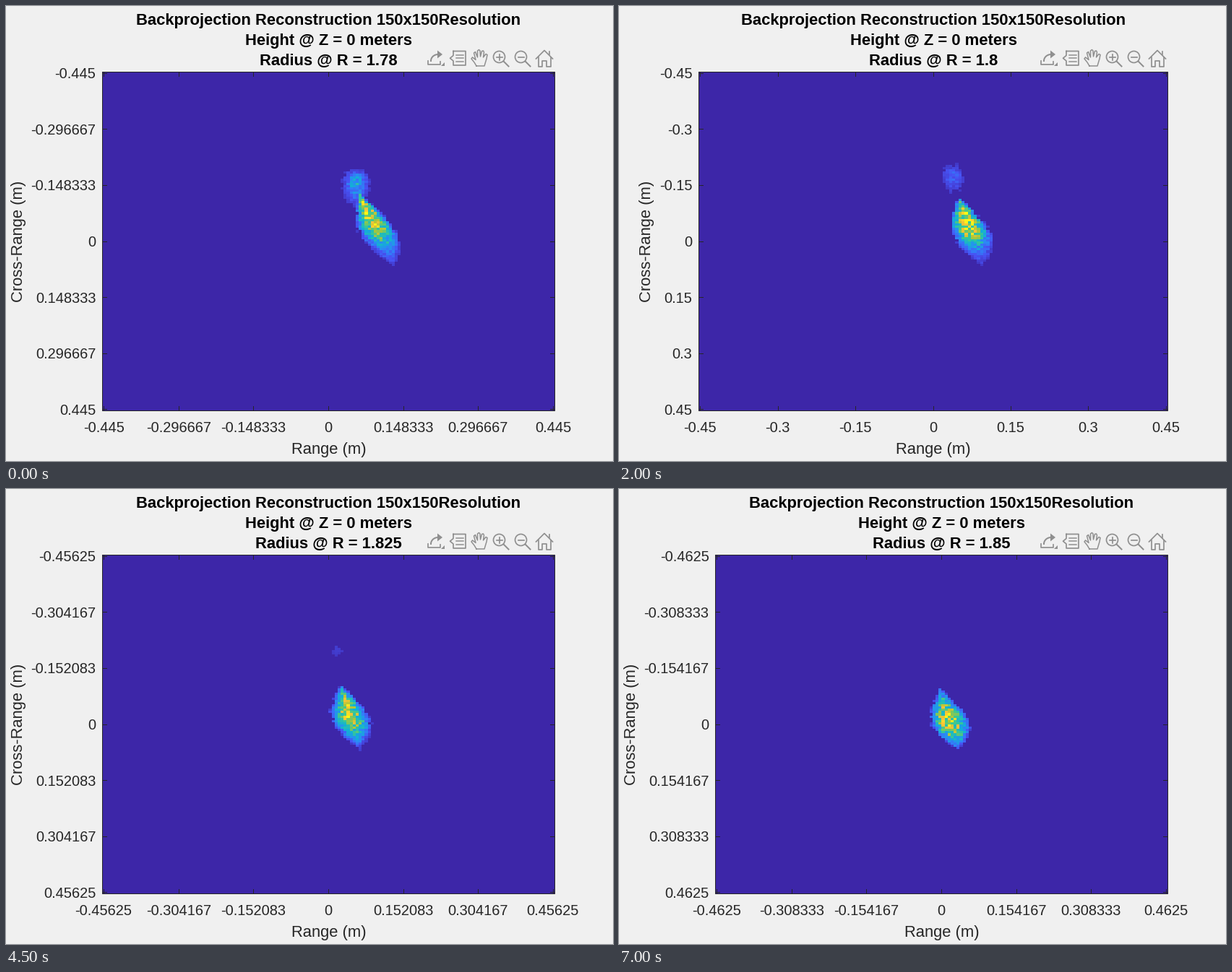
Write a matplotlib script that moves like this. It is 840 px wide and 630 px high and loops after 7.5 s.

```python
import numpy as np
import matplotlib.pyplot as plt
from matplotlib.animation import FuncAnimation
from matplotlib.collections import LineCollection
from matplotlib.colors import LinearSegmentedColormap
from matplotlib.patches import Circle, Polygon

W, H, DPI = 840, 630, 100
FRAMES, INTERVAL = 15, 500
TOP, BOTTOM, RIGHT = 91.5, 560.5, 759.5
CELLS = 150
INK, ICON = "#262626", "#8f8f8f"

plt.rcParams["font.family"] = "Liberation Sans"

parula = LinearSegmentedColormap.from_list("parula", [
    (0.2422, 0.1504, 0.6603), (0.2810, 0.3228, 0.9579),
    (0.1786, 0.5289, 0.9682), (0.0689, 0.6948, 0.8394),
    (0.2161, 0.7843, 0.5923), (0.6720, 0.7793, 0.2227),
    (0.9970, 0.7659, 0.2199), (0.9769, 0.9839, 0.0805)])


def body(x, y, t, rng):
    """Slanted teardrop, drifting left and shrinking from the top."""
    start, end = -66 + 16 * t, 34
    s = np.clip((y - start) / (end - start), 0, 1)
    half = 27 * np.sin(np.pi * s ** 1.2) ** 0.8 + 0.1
    spine = 62 - 57 * t + (0.29 + 0.19 * np.exp(-5 * t)) * (y + 26)
    u = np.abs(x - spine) / half
    reach = 37 + 10 * np.exp(-6 * t)
    power = np.exp(-((y + 36 - 30 * t) / reach) ** 2)
    v = power * (0.12 + 0.88 * (1 - np.minimum(u, 1) ** 1.5))
    return np.where(u ** 2 < rng.uniform(0.7, 1.2, v.shape), v, 0)


def head(x, y, t):
    """Smaller echo above the body that fades out as it climbs."""
    dx, dy = x - (38 - 40 * t), y + 82 + 36 * t
    tall = np.where(dy < 0, 14, 24)
    return 0.5 * np.exp(-3 * t - (dx / 14) ** 2 - (dy / tall) ** 2)


def reflection(i):
    rng = np.random.default_rng(40 + i)
    t = i / (FRAMES - 1)
    n = np.arange(CELLS) - (CELLS - 1) / 2
    x, y = n[None, :] * 4.173, n[:, None] * 3.127
    v = np.maximum(body(x, y, t, rng), head(x, y, t))
    v = v * rng.uniform(0.5, 1.05, v.shape)
    v[v < 0.055] = 0
    return v / v.max()


fig = plt.figure(figsize=(W / DPI, H / DPI), dpi=DPI, facecolor="#f0f0f0")
ax = fig.add_axes([0, 0, 1, 1])
image = ax.imshow(np.zeros((CELLS, CELLS)), cmap=parula, vmin=0, vmax=1,
                  interpolation="nearest", aspect="auto")
ax.axis("off")


def label(x, y, s="", px=20, color=INK, **kw):
    return ax.text(x, y, s, fontsize=px * 72 / DPI, color=color,
                   va="baseline", **kw)


def stroke(points, lw=1.7):
    xs, ys = zip(*points)
    ax.plot(xs, ys, color=ICON, lw=lw * 72 / DPI)


def ring(x, y, r):
    ax.add_patch(Circle((x, y), r, fill=False, ec=ICON, lw=1.7 * 72 / DPI))


def solid(points):
    ax.add_patch(Polygon(points, fc=ICON, ec="none"))


def toolbar():
    # share
    stroke([(584, 76), (584, 80.5), (601, 80.5), (601, 77)])
    a = np.linspace(0, np.pi / 2, 12)
    stroke(list(zip(598 - 10 * np.cos(a), 76 - 9 * np.sin(a))), 2)
    solid([(597, 61.5), (604, 67), (597, 72.5)])
    solid([(607, 78), (607, 83), (602, 83)])
    # data tip
    stroke([(619, 62.5), (636, 62.5), (636, 82), (619, 82), (619, 76),
            (614.5, 72.3), (619, 68.5), (619, 62.5)])
    for y in (67.5, 72.3, 77):
        stroke([(623, y), (632.5, y)], 1.5)
    # hand
    stroke([(651, 83), (648, 78), (644, 73), (645.5, 71), (650, 74.5),
            (647.5, 65), (649.5, 63.5), (652.5, 71), (652.5, 62),
            (654.5, 60.5), (656, 62), (656.5, 70), (658.5, 62.5),
            (660.5, 62), (661.5, 64), (660.5, 71), (664, 66.5),
            (666, 67.5), (665, 73), (662, 83), (651, 83)], 1.5)
    # zoom in and out
    for x in (682.5, 712.5):
        ring(x, 70.5, 8)
        stroke([(x + 6, 76.5), (x + 13, 83.5)], 2)
        stroke([(x - 4, 70.5), (x + 4, 70.5)])
    stroke([(682.5, 66.5), (682.5, 74.5)])
    # home
    stroke([(733.5, 73), (745, 61.5), (756.5, 73)])
    stroke([(736.5, 71), (736.5, 83.5), (742, 83.5), (742, 75.5),
            (748, 75.5), (748, 83.5), (753.5, 83.5), (753.5, 71)])
    stroke([(752, 67), (752, 62.5)])


toolbar()
ax.set_xlim(0, W)
ax.set_ylim(H, 0)
ax.set_autoscale_on(False)

titles = [label(0, y, s, 22, "black", ha="center", weight="bold")
          for y, s in ((26, "Backprojection Reconstruction 150x150Resolution"),
                       (54, "Height @ Z = 0 meters"), (82, ""))]
x_name = label(0, 620, "Range (m)", 22, ha="center")
y_name = label(23, 325.5, "Cross-Range (m)", 22, ha="center", rotation=90,
               rotation_mode="anchor")
x_labels = [label(0, 590, ha="center") for _ in range(7)]
y_labels = [label(0, 0, ha="right") for _ in range(7)]
box = LineCollection([], colors=INK, linewidths=72 / DPI, zorder=3,
                     capstyle="projecting", snap=False)
ax.add_collection(box, autolim=False)


def ticks(low, high):
    reach = (high - low) / 2 * (CELLS - 1) / CELLS
    return (low + high) / 2 + np.linspace(-reach, reach, 7)


def update(i):
    radius = 1.78 + 0.005 * i
    texts = [f"{radius / 4 * k / 3:.6g}" for k in range(-3, 4)]
    longest = max(map(len, texts))
    # the plot gives way to the longest label, down to a fixed margin
    left = max(110, 25.5 + 12 * longest) // 1 + 0.5
    mid = (left + RIGHT) / 2

    image.set_data(reflection(i))
    image.set_extent((left + 0.5, RIGHT - 0.5, BOTTOM - 0.5, TOP + 0.5))

    lines = [[(left, TOP), (RIGHT, TOP), (RIGHT, BOTTOM), (left, BOTTOM),
              (left, TOP)]]
    for x, y, s, tx, ty in zip(ticks(left, RIGHT), ticks(TOP, BOTTOM),
                               texts, x_labels, y_labels):
        tx.set_text(s)
        tx.set_x(x - 0.5)
        ty.set_text(s)
        ty.set_position((left - 9, y + 7))
        x, y = np.floor(x) + 0.5, np.floor(y) + 0.5
        lines += [[(x, TOP), (x, TOP + 6)], [(x, BOTTOM), (x, BOTTOM - 6)],
                  [(left, y), (left + 6, y)], [(RIGHT, y), (RIGHT - 6, y)]]
    box.set_segments(lines)

    titles[2].set_text(f"Radius @ R = {radius:.4g}")
    for text in (*titles, x_name):
        text.set_x(mid)
    y_name.set_x(44 if longest < 7 else 23)
    return []


anim = FuncAnimation(fig, update, frames=FRAMES, interval=INTERVAL,
                     init_func=lambda: update(0), repeat=True,
                     repeat_delay=0, blit=False)
plt.show()
```
